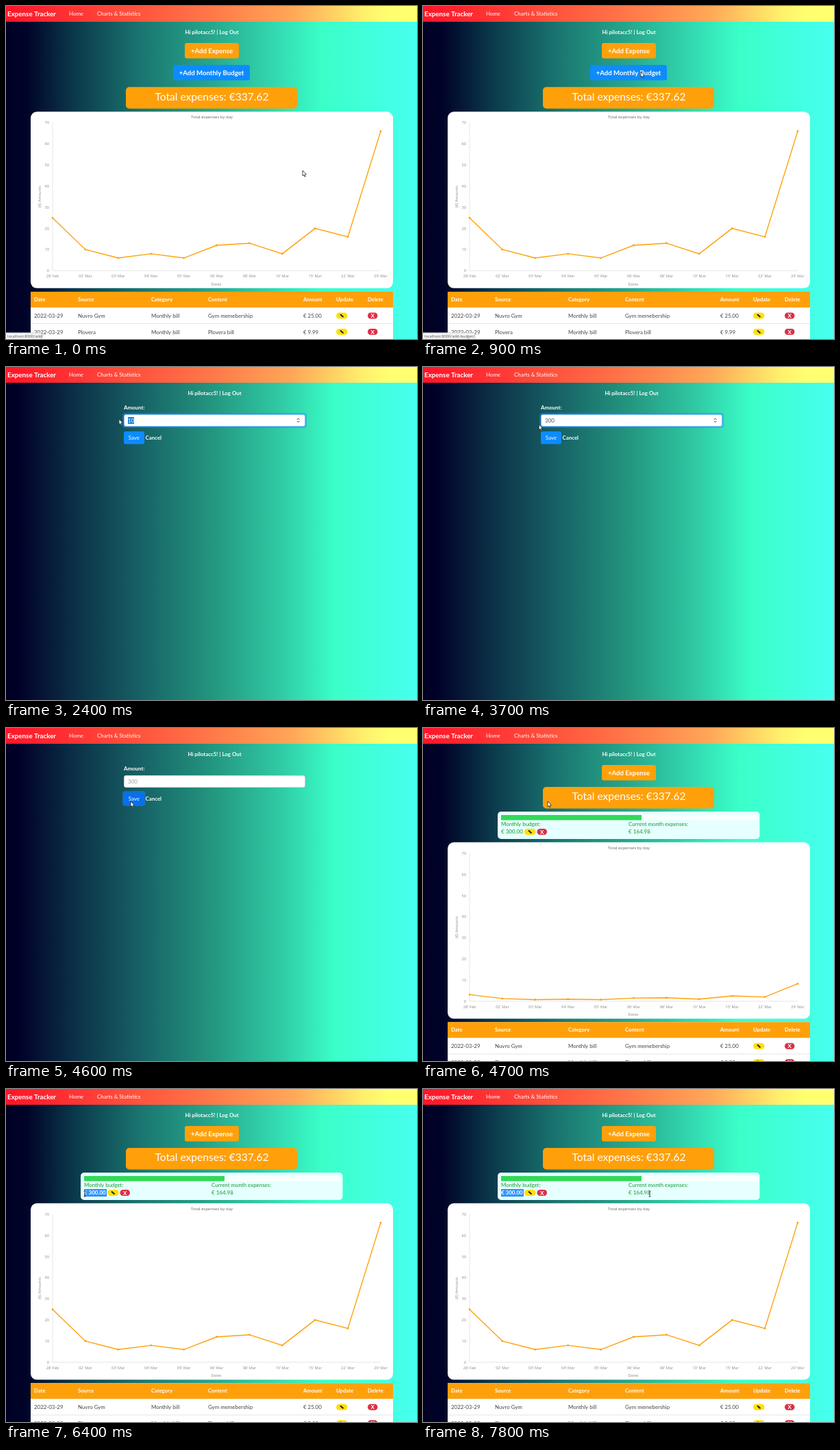
An HTML page with a canvas that plays this animation: 600 px wide and 486 px high, repeating every 8 s.

```html
<!DOCTYPE html>
<html lang="en">
<head>
<meta charset="utf-8">
<title>Expense Tracker</title>
<style>
  html, body { margin: 0; width: 100%; height: 100%; overflow: hidden; }
  canvas { display: block; }
</style>
</head>
<body>
<canvas id="stage" width="600" height="486"></canvas>
<script>
const ctx = document.getElementById('stage').getContext('2d');
const LOOP = 8000, FORM_OPEN = 1000, FORM_SENT = 4700, CHART_START = 4667;
const ORANGE = '#ffa00a', BLUE = '#0d8bff', GREEN = '#12992f', WHITE = '#fff';
const SANS = 'Lato, sans-serif', CHART_FONT = '"Open Sans", sans-serif';

const NAV = [[0, '#ff1428'], [.17, '#ff3434'], [.5, '#ff7848'], [.7, '#ffa858'], [.87, '#fff06c'], [.93, '#ffff70'], [1, '#ffff70']];
const FORM_BG = [[0, '#000024'], [.03, '#000028'], [.17, '#0c3147'], [.33, '#176266'], [.5, '#23957f'], [.67, '#30cba5'], [.8, '#3affc8'], [1, '#47fff0']];
const HOME_BG = [[0, '#000024'], [.05, '#000428'], [.17, '#0b3a4c'], [.33, '#1a7670'], [.5, '#27a78c'], [.67, '#34deb4'], [.77, '#3affc8'], [1, '#47fff0']];

const DAYS = ["28' Feb", "02' Mar", "03' Mar", "04' Mar", "05' Mar", "06' Mar", "08' Mar", "10' Mar", "15' Mar", "22' Mar", "29' Mar"];
const SPENT = [25, 10, 6, 8, 6, 12, 13, 8, 20, 16, 66];
const COLUMNS = [41, 105, 212, 295, 434, 482, 528];
const HEADINGS = ['Date', 'Source', 'Category', 'Content', 'Amount', 'Update', 'Delete'];
const ROWS = [
  ['2022-03-29', 'Nuvro Gym', 'Monthly bill', 'Gym memebership', '€ 25.00'],
  ['2022-03-29', 'Plovera', 'Monthly bill', 'Plovera bill', '€ 9.99']
];

// Pointer path: time, x, y
const PATH = [
  [0, 433, 240], [300, 390, 190], [700, 322, 100], [900, 318, 96], [1100, 318, 96],
  [1400, 192, 77], [1600, 192, 77], [1800, 187, 77], [1900, 187, 77], [2200, 165, 76],
  [3600, 165, 76], [4000, 182, 107], [4700, 182, 107], [5000, 272, 68], [5100, 268, 72],
  [5500, 143, 153], [5800, 145, 153], [6200, 115, 153], [6700, 115, 153],
  [7400, 322, 153], [7800, 331, 153], [8000, 331, 153]
];

function pointer(t) {
  const i = PATH.findIndex(p => p[0] > t);
  const [t0, x0, y0] = PATH[i - 1], [t1, x1, y1] = PATH[i];
  const k = (t - t0) / (t1 - t0);
  return [x0 + (x1 - x0) * k, y0 + (y1 - y0) * k];
}

function gradient(stops) {
  const g = ctx.createLinearGradient(0, 0, 600, 0);
  stops.forEach(([at, color]) => g.addColorStop(at, color));
  return g;
}

function box(x, y, w, h, r, fill, stroke) {
  ctx.beginPath();
  ctx.roundRect(x, y, w, h, r);
  if (fill) { ctx.fillStyle = fill; ctx.fill(); }
  if (stroke) { ctx.strokeStyle = stroke; ctx.stroke(); }
}

function line(points, color, width) {
  ctx.beginPath();
  points.forEach(p => ctx.lineTo(...p));
  ctx.strokeStyle = color;
  ctx.lineWidth = width;
  ctx.stroke();
  ctx.lineWidth = 1;
}

function text(str, x, y, size, color, { bold, align = 'left', font = SANS } = {}) {
  ctx.font = `${bold ? 'bold ' : ''}${size}px ${font}`;
  ctx.textAlign = align;
  ctx.fillStyle = color;
  ctx.fillText(str, x, y);
}

const bold = { bold: true }, centered = { align: 'center' }, boldCentered = { bold: true, align: 'center' };

function frame(stops, middle) {
  ctx.fillStyle = gradient(stops);
  ctx.fillRect(0, 0, 600, 486);
  ctx.fillStyle = gradient(NAV);
  ctx.fillRect(0, 0, 600, 23);
  text('Expense Tracker', 2, 14.5, 9.8, WHITE, bold);
  text('Home', 92, 13.5, 7.9, WHITE);
  text('Charts & Statistics', 133, 13.5, 7.9, WHITE);
  text('Hi pilotacc5! | Log Out', middle, 40.5, 7.9, WHITE, boldCentered);
}

function editPill(x, y) {
  box(x, y, 16.5, 9, 4.5, '#ffe00a');
  line([[x + 6, y + 2.5], [x + 10.5, y + 6.5]], '#222', 2);
}

function deletePill(x, y) {
  box(x, y, 14.5, 9, 4.5, '#dc3045');
  text('X', x + 7.25, y + 7.5, 8, WHITE, boldCentered);
}

function chart(top, growth) {
  const zero = top + 232, left = 68, step = 47.9, unit = 216 / 70;
  const small = (str, x, y, align) => text(str, x, y, 5.6, '#888', { font: CHART_FONT, align });
  box(36, top, 529, 257.5, 9, WHITE);
  text('Total expenses by day', 300.5, top + 10, 6, '#666', { font: CHART_FONT, align: 'center' });
  line([[left, top + 16], [left, zero]], '#e6e6e6', 1);
  line([[left, zero], [547, zero]], '#e6e6e6', 1);
  for (let v = 0; v <= 70; v += 10) small(v, 63, zero - v * unit + 2, 'right');
  DAYS.forEach((day, i) => small(day, left + i * step, zero + 10, 'center'));
  small('Dates', 307, zero + 21.5, 'center');
  ctx.save();
  ctx.translate(51, top + 124);
  ctx.rotate(-Math.PI / 2);
  small('(€) Amounts', 0, 0, 'center');
  ctx.restore();
  const points = SPENT.map((v, i) => [left + i * step, zero - v * unit * growth]);
  line(points, ORANGE, 1.4);
  points.forEach(([x, y]) => box(x - 1.4, y - 1.4, 2.8, 2.8, 1.4, ORANGE));
}

function table(top) {
  box(36, top, 529, 80, 0, WHITE);
  box(36, top, 529, 23, 0, ORANGE);
  HEADINGS.forEach((name, i) => text(name, COLUMNS[i], top + 14, 7.7, WHITE, bold));
  ROWS.forEach((row, r) => {
    const y = top + 23.5 * (r + 1);
    row.forEach((cell, i) => text(cell, COLUMNS[i], y + 14.5, 7.9, '#444'));
    editPill(482, y + 7);
    deletePill(528, y + 7);
    line([[36, y + 23], [565, y + 23]], '#e4e6e9', 1);
  });
}

function totals(top) {
  box(175, top, 250, 31.5, 5, ORANGE);
  text('Total expenses: €337.62', 300.5, top + 19.3, 15.6, WHITE, centered);
}

function budget(selected) {
  box(109, 122, 382.5, 40, 5, '#e6ffff');
  box(114, 127, 374, 7.5, 2, '#f8ffff');
  box(114, 127, 205, 7.5, 0, '#32d957');
  text('Monthly budget:', 114, 142.7, 7.9, GREEN);
  text('Current month expenses:', 300, 142.7, 7.9, GREEN);
  text('€ 300.00', 114, 154.3, 8, GREEN);
  text('€ 164.98', 300, 154.3, 8, GREEN);
  if (selected < 147) {
    ctx.save();
    box(selected, 146, 147 - selected, 11, 0, '#2f93ff');
    ctx.clip();
    text('€ 300.00', 114, 154.3, 8, WHITE, bold);
    ctx.restore();
  }
  editPill(148, 147);
  deletePill(166.5, 147);
}

function home(t, mouseX) {
  const saved = t >= FORM_SENT;
  frame(HOME_BG, 300.5);
  box(261, 54, 79, 22.5, 3, ORANGE);
  text('+Add Expense', 300.5, 68.5, 9.6, WHITE, boldCentered);
  if (saved) {
    const left = 1 - Math.min(1, (t - CHART_START) / 1000);
    totals(86);
    budget(t < 5900 ? 147 : t < 6200 ? mouseX : 114);
    chart(166.8, 1 - left ** 4);
    table(429.3);
  } else {
    box(244, 86, 112, 22.5, 3, BLUE);
    text('+Add Monthly Budget', 300, 100.7, 9.6, WHITE, boldCentered);
    totals(118.3);
    chart(154.3, 1);
    table(417);
  }
}

function form(t, mouseX) {
  const focused = t >= 1900 && t < 4500;
  const value = t < 3000 ? '10' : '300'.slice(0, 1 + Math.floor((t - 3000) / 100));
  frame(FORM_BG, 304.5);
  text('Amount:', 172, 61.5, 7.9, WHITE, bold);
  if (focused) box(170, 67, 269, 22, 4, 'rgba(30,140,255,.45)');
  box(172.5, 69.5, 264, 17, 2.5, WHITE, focused ? '#80bdff' : '#ced4da');
  text(value, 178, 81, 8, focused ? '#495057' : '#999');
  if (t >= 1900 && t < 3000) {
    const from = Math.max(178, Math.min(187, mouseX));
    ctx.save();
    box(from, 73, 187 - from, 10, 0, '#1f83d6');
    ctx.clip();
    text(value, 178, 81, 8, WHITE);
    ctx.restore();
  }
  if (t >= 3000 && t < 3400) {
    const x = 178.5 + ctx.measureText(value).width;
    line([[x, 74], [x, 82]], '#333', .7);
  }
  if (t >= 1400 && t < 4500) {
    line([[425, 76.8], [426.7, 75], [428.4, 76.8]], '#444', 1);
    line([[425, 78.8], [426.7, 80.6], [428.4, 78.8]], '#444', 1);
  }
  if (!focused && t >= 4500) box(170, 92, 33.5, 22, 4, 'rgba(40,130,255,.5)');
  box(172, 94, 30, 18.5, 2.5, t >= 4000 ? '#0670f0' : BLUE);
  text('Save', 186.8, 106, 7.9, WHITE, centered);
  text('Cancel', 203.5, 105.7, 7.9, WHITE, bold);
}

function status(t) {
  let path = '';
  if (t < 700 || (t >= 5000 && t < 6000)) path = 'add/';
  else if (t < 1300) path = 'add-budget/';
  if (!path) return;
  box(-2, 477, path === 'add/' ? 54 : 78, 12, 2, '#f4f6f8', '#c8cccf');
  text('localhost:8000/' + path, 2, 484, 5.7, '#555', { font: CHART_FONT });
}

function cursor(t, x, y) {
  const overText = (t >= 1400 && t < 2100) || t >= 5400;
  if (overText) {
    line([[x - 1.5, y - 4], [x + 1.5, y - 4]], '#333', .8);
    line([[x, y - 4], [x, y + 4]], '#333', .9);
    line([[x - 1.5, y + 4], [x + 1.5, y + 4]], '#333', .8);
    return;
  }
  ctx.beginPath();
  [[0, 0], [0, 8], [1.8, 6.4], [3, 9.2], [4.3, 8.6], [3.1, 5.9], [5.4, 5.7]]
    .forEach(([dx, dy]) => ctx.lineTo(x + dx, y + dy));
  ctx.closePath();
  ctx.fillStyle = WHITE;
  ctx.fill();
  ctx.strokeStyle = '#222';
  ctx.lineWidth = .8;
  ctx.stroke();
  ctx.lineWidth = 1;
}

function draw() {
  // The screen refreshes ten times a second.
  const t = Math.floor(performance.now() % LOOP / 100) * 100;
  const [x, y] = pointer(t);
  if (t >= FORM_OPEN && t < FORM_SENT) form(t, x);
  else home(t, x);
  status(t);
  cursor(t, x, y);
  requestAnimationFrame(draw);
}
draw();
</script>
</body>
</html>
```
